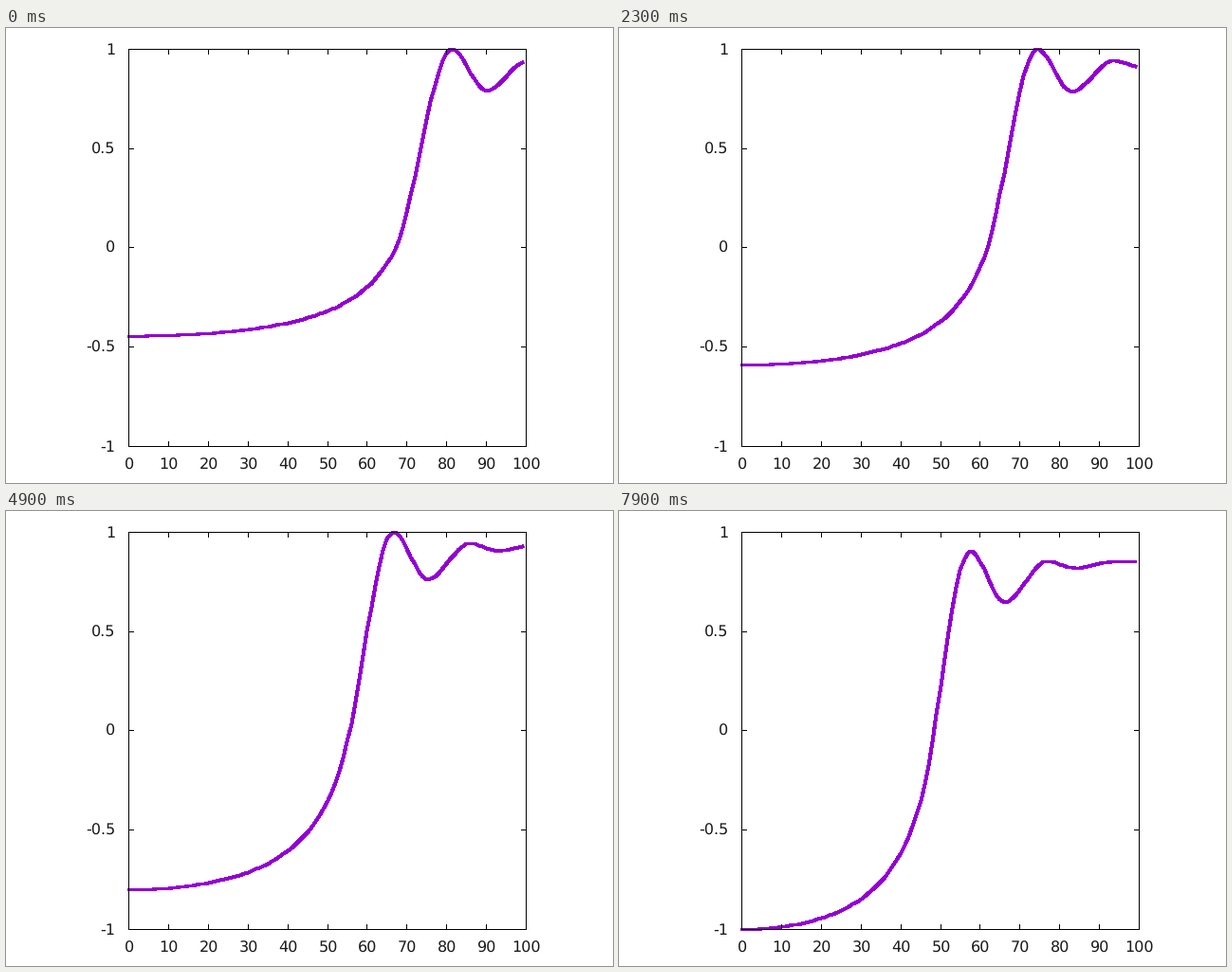
Animation, 640 px wide and 480 px high, one loop 8000 ms. Source, as a matplotlib script:

```python
import numpy as np
import matplotlib.pyplot as plt
from matplotlib.animation import FuncAnimation

W, H, DPI = 640, 480, 100
FRAMES, INTERVAL = 80, 100
PT = 72 / DPI  # points per pixel
LEFT, BOTTOM, SPAN = 129.5, 441.5, 419
TICK = 5
X = np.arange(100.0)

plt.rcParams["text.hinting"] = "none"


def ease(u, a, b, slope=0):
    """Cubic from a to b that starts with the given slope and ends level."""
    return a + (b - a) * u * u * (3 - 2 * u) + slope * u * (1 - u) ** 2


def ripples(s, t):
    """Decaying swings at distance s behind the crest."""
    at = np.array([0, 8.6, 19.2, 26.5, 37, 46])
    height = np.array([1, .79 - .0012 * t * t, .942, .905, .943, .935])
    i = np.clip(np.searchsorted(at, s, side="right") - 1, 0, len(at) - 2)
    u = (s - at[i]) / (at[i + 1] - at[i])
    return ease(u, height[i], height[i + 1])


def profile(t):
    crest = 81.3 - 3.01 * t
    depth = .444 + .0542 * t + .00372 * t * t
    zero = .826 + .002 * t  # zero crossing as a fraction of the crest position
    k = 1 / zero**2 - 1
    q = X / crest

    qt = np.minimum(q, zero)
    tail = depth * (k * qt**2 / (1 - qt**2) - 1)
    slope = depth * k * 2 * zero / (1 - zero**2) ** 2
    rise = ease((q - zero) / (1 - zero), 0, 1, slope * (1 - zero))
    y = np.where(q < zero, tail, np.where(q < 1, rise, ripples(X - crest, t)))
    return y / np.abs(y).max()


# Data to pixel centres
def px(x):
    return LEFT + np.floor(SPAN * x / 100 + .5)


def py(y):
    return BOTTOM - np.floor(SPAN * (y + 1) / 2 + .5)


fig = plt.figure(figsize=(W / DPI, H / DPI), dpi=DPI, facecolor="white")
ax = fig.add_axes([0, 0, 1, 1])
ax.set(xlim=(0, W), ylim=(H, 0))
ax.axis("off")


def rule(xs, ys):
    ax.plot(xs, ys, color="black", lw=PT, zorder=3, snap=False,
            solid_capstyle="projecting")


def label(x, y, text, align):
    ax.text(x, y, text, ha=align, va="baseline", family="DejaVu Sans",
            size=16 * PT, color="#1a1a1a")


right, top = px(100), py(1)
rule([LEFT, right, right, LEFT, LEFT], [BOTTOM, BOTTOM, top, top, BOTTOM])
for v in range(0, 101, 10):
    x = px(v)
    rule([x, x], [BOTTOM, BOTTOM - TICK])
    rule([x, x], [top, top + TICK])
    label(x + .3, 465.5, str(v), "center")
for v in (-1, -.5, 0, .5, 1):
    y = py(v)
    rule([LEFT, LEFT + TICK], [y, y])
    rule([right, right - TICK], [y, y])
    label(115.5, y + 5.5, f"{v:g}", "right")

curve, = ax.plot([], [], color="#9400d3", lw=3 * PT, zorder=2, snap=False,
                 antialiased=False, solid_capstyle="projecting",
                 solid_joinstyle="round")


def update(i):
    curve.set_data(px(X), py(profile(i * INTERVAL / 1000)))
    return curve,


anim = FuncAnimation(fig, update, frames=FRAMES, interval=INTERVAL,
                     repeat=True, repeat_delay=0, blit=False)
plt.show()
```
